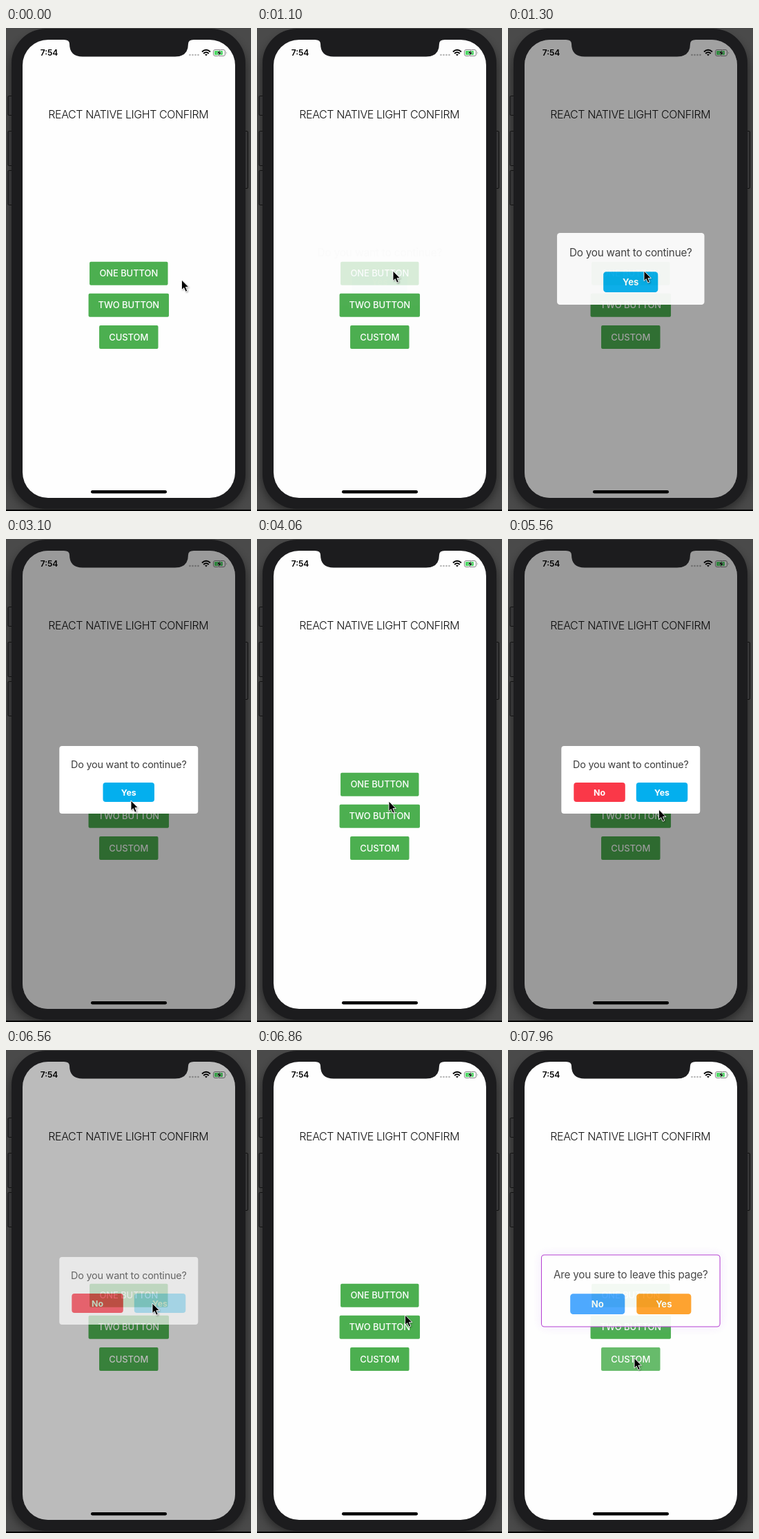
Write an HTML page that moves like this. It is 355 px wide and 700 px high and loops after 8 s.

```html
<!DOCTYPE html>
<html lang="en">
<head>
<meta charset="utf-8">
<title>Light confirm demo</title>
<style>
  html, body { margin: 0; width: 100%; height: 100%; overflow: hidden; background: #464646; }
  svg { display: block; width: 100vw; height: 100vh; }
  text { font-family: Inter, "Liberation Sans", sans-serif; text-anchor: middle; }
  .title { font-size: 16px; font-weight: 300; letter-spacing: -.42px; fill: #111; }
  .clock { font-size: 12px; font-weight: 600; }
  .label { font-size: 13px; font-weight: 500; letter-spacing: -.08px; fill: #fff; }
  .ask { font-size: 14.4px; letter-spacing: -.22px; fill: #3c3c3c; }
  .choice { font-size: 12.4px; font-weight: 700; fill: #fff; }
</style>
</head>
<body>
<svg viewBox="0 0 355 700">
  <defs>
    <clipPath id="screen"><rect x="24" y="17" width="308" height="664" rx="37"/></clipPath>
    <filter id="blur" x="-20%" y="-20%" width="140%" height="140%"><feGaussianBlur stdDeviation="7"/></filter>
    <filter id="soft" x="-50%" y="-50%" width="200%" height="200%"><feGaussianBlur stdDeviation="1.2"/></filter>
  </defs>

  <!-- phone -->
  <rect width="355" height="700" fill="#4a4a4a"/>
  <rect x="6" y="10" width="343" height="692" rx="52" opacity=".45" filter="url(#blur)"/>
  <rect y="698" width="355" height="2"/>
  <g fill="#353536" stroke="#111" stroke-width="1">
    <rect x="3" y="98.500" width="8" height="28" rx="1.500"/>
    <rect x="3" y="149.500" width="8" height="50" rx="1.500"/>
    <rect x="3" y="206.500" width="8" height="50" rx="1.500"/>
    <rect x="344" y="149.500" width="6.500" height="83" rx="1.500"/>
  </g>
  <rect x="8" y="1" width="339" height="696" rx="50" fill="#1c1c1e"/>

  <g clip-path="url(#screen)">
    <rect x="24" y="17" width="308" height="664" fill="#fefefe"/>
    <text class="clock" x="62.500" y="40">7:54</text>
    <g fill="#b5b5b5">
      <circle cx="266.500" cy="39" r="1.300"/><circle cx="270.500" cy="39" r="1.300"/>
      <circle cx="274.500" cy="39" r="1.300"/><circle cx="278.500" cy="39" r="1.300"/>
    </g>
    <g fill="none" stroke="#000" stroke-width="1.900">
      <path d="M284 34.500Q290 29 296 34.500M286.200 37Q290 33.500 293.800 37"/>
      <path d="M288 38H292L290 40.500z" fill="#000" stroke="none"/>
    </g>
    <rect x="300.500" y="31.500" width="17" height="9" rx="2.500" fill="#fff" stroke="#777" stroke-width=".9"/>
    <rect x="302" y="33" width="12" height="6" rx="1" fill="#4cd964"/>
    <path d="M310.500 31.500L305.500 36.800H308.500L307.300 41L312.500 35.300H309.500z" stroke="#fff" stroke-width=".5"/>
    <path d="M319 34.500Q320.500 36 319 37.500z" fill="#777"/>
    <text class="title" x="177.300" y="131">REACT NATIVE LIGHT CONFIRM</text>
    <g id="buttons"></g>
    <rect x="123" y="670" width="110" height="4.500" rx="2.250"/>
    <rect id="dim" x="24" y="17" width="308" height="664"/>
    <g id="dialogs"></g>
  </g>
  <path d="M84 16V17Q92 17 92 23Q92 41.500 111 41.500H245Q264 41.500 264 23Q264 17 272 17V16z" fill="#1c1c1e"/>

  <g id="cursor">
    <path d="M1 2V16L4 13L7 19L10 17L7 12H12z" opacity=".35" filter="url(#soft)"/>
    <path d="M0 0V14.600L3.300 11.600L5.700 17.200L8.300 16.100L5.900 10.600H10.400z" stroke="#fff" stroke-width=".9"/>
  </g>
</svg>
<script>
const $ = id => document.getElementById(id);
const clamp = v => Math.min(1, Math.max(0, v));
const easeOut = p => 1 - (1 - p) ** 2;
const easeInOut = p => p < .5 ? 2 * p * p : 1 - 2 * (1 - p) ** 2;

const block = (x, y, w, h, r, fill, cls, label) =>
  `<g><rect x="${x}" y="${y}" width="${w}" height="${h}" rx="${r}" fill="${fill}"/>
   <text class="${cls}" x="${x + w / 2}" y="${y + h / 2 + 4.6}">${label}</text></g>`;

const green = (y, w, label) => block(177.8 - w / 2, y, w, 34, 2, '#4caf50', 'label', label);
const choice = (x, fill, label) => block(x, 353, 74.5, 28, 4, fill, 'choice', label);

const dialog = (w, question, choices, border) => {
  const box = `x="${177.8 - w / 2}" y="300" width="${w}" height="98" rx="4"`;
  const glow = border ? `<rect ${box} fill="#b06cf0" opacity=".16" filter="url(#blur)"/>` : '';
  return `<g>${glow}<rect ${box} fill="#fff" stroke="${border || 'none'}"/>
    <text class="ask" x="177.8" y="332.300">${question}</text>${choices}</g>`;
};

$('buttons').innerHTML = green(338.7, 113.5, 'ONE BUTTON') +
  green(384.7, 116.5, 'TWO BUTTON') + green(431, 85.5, 'CUSTOM');

const ask = 'Do you want to continue?';
$('dialogs').innerHTML =
  dialog(201, ask, choice(140.5, '#03afee', 'Yes')) +
  dialog(201, ask, choice(95.3, '#fa3848', 'No') + choice(185.8, '#03afee', 'Yes')) +
  dialog(243.5, 'Are you sure to leave this page?',
    choice(95.3, '#42a3ff', 'No') + choice(185.8, '#ff9d22', 'Yes'), '#b136cf');

const buttons = [...$('buttons').children];
const dialogs = [...$('dialogs').children];
const yes = dialogs.map(d => d.lastElementChild);

// [press, release] of each button, then [open, close] of each dialog
const taps = [[960, 1100], [4460, 4630], [7600, 7760]];
const yesTaps = [[3450, 3600], [6300, 6500]];
const spans = [[1100, 3600], [4630, 6500], [7760, 9000]];

// time, x, y of the pointer
const path = [
  [0, 254.5, 365], [160, 254.5, 365], [700, 197, 352], [1930, 197, 352],
  [2200, 206, 362], [2500, 190, 383], [2730, 181, 379], [3600, 181, 379],
  [4060, 191, 380], [4400, 199, 394], [4700, 199, 394], [5300, 218.5, 392],
  [5560, 218.5, 392], [5900, 224, 379], [6200, 212, 367], [6560, 212, 367],
  [6860, 214.5, 384], [7330, 214.5, 384], [7580, 183, 446.5], [8000, 183, 446.5]
];

const pressed = (t, [down, up]) =>
  t < down ? 1 : t < up ? .2 : .2 + .8 * clamp((t - up) / 250);

function pointer(t) {
  const i = path.findIndex(k => k[0] > t);
  const [t0, x0, y0] = path[i - 1], [t1, x1, y1] = path[i];
  const p = easeInOut((t - t0) / (t1 - t0));
  return [x0 + (x1 - x0) * p, y0 + (y1 - y0) * p];
}

function draw(now) {
  const t = now % 8000;
  buttons.forEach((b, i) => b.setAttribute('opacity', pressed(t, taps[i])));
  yesTaps.forEach((tap, i) => yes[i].setAttribute('opacity', pressed(t, tap)));
  let dim = 0;
  dialogs.forEach((d, i) => {
    const [open, close] = spans[i];
    const alpha = easeOut(clamp((t - open) / 270)) * (1 - easeOut(clamp((t - close) / 340)));
    const scale = 1.08 - .08 * easeInOut(clamp((t - open) / 600));
    d.setAttribute('opacity', alpha);
    d.setAttribute('transform', `translate(177.8 349) scale(${scale}) translate(-177.8 -349)`);
    if (i < 2) dim = Math.max(dim, alpha);
  });
  $('dim').setAttribute('opacity', dim * .395);
  $('cursor').setAttribute('transform', `translate(${pointer(t)})`);
}

const start = performance.now();
(function tick() {
  draw(performance.now() - start);
  requestAnimationFrame(tick);
})();
</script>
</body>
</html>
```
